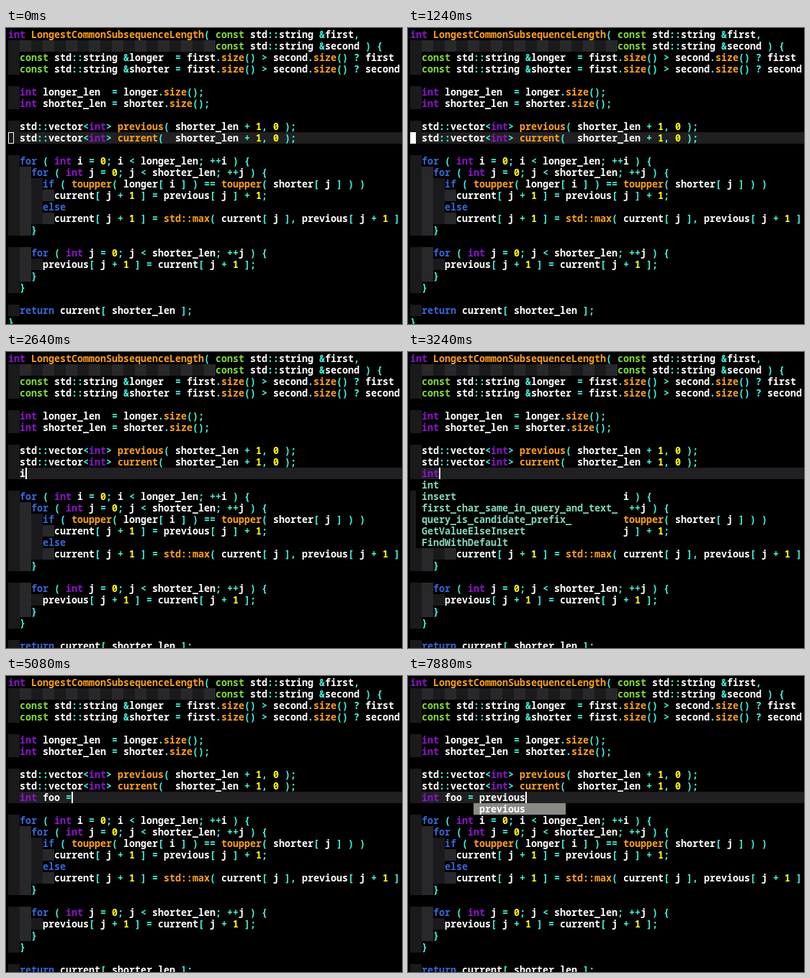
Recreate the animation shown at these times as an HTML page with a canvas. Size 550x412 px, loop 8000 ms.

```html
<!DOCTYPE html>
<html lang="en">
<head>
<meta charset="utf-8">
<title>Code completion</title>
<style>
  html, body { margin: 0; width: 100%; height: 100%; overflow: hidden; background: #000; }
  canvas { display: block; }
</style>
</head>
<body>
<canvas id="stage" width="550" height="412"></canvas>
<script>
const ctx = document.getElementById('stage').getContext('2d');
const LOOP = 8000, COL = 8, ROW = 16, LEFT = 3, TOP = 1, EDIT_ROW = 10;
const WHITE = '#ffffff', GUIDES = ['#1a1a1c', '#28282a'], LINE_BG = '#202022';
const MENU_TEXT = '#84d8b8', MENU_PICK = '#8a8a84';

const code = `int LongestCommonSubsequenceLength( const std::string &first,
                                    const std::string &second ) {
  const std::string &longer  = first.size() > second.size() ? first
  const std::string &shorter = first.size() > second.size() ? second

  int longer_len  = longer.size();
  int shorter_len = shorter.size();

  std::vector<int> previous( shorter_len + 1, 0 );
  std::vector<int> current(  shorter_len + 1, 0 );

  for ( int i = 0; i < longer_len; ++i ) {
    for ( int j = 0; j < shorter_len; ++j ) {
      if ( toupper( longer[ i ] ) == toupper( shorter[ j ] ) )
        current[ j + 1 ] = previous[ j ] + 1;
      else
        current[ j + 1 ] = std::max( current[ j ], previous[ j + 1 ]
    }

    for ( int j = 0; j < shorter_len; ++j ) {
      previous[ j + 1 ] = current[ j + 1 ];
    }
  }

  return current[ shorter_len ];
}`.split('\n');

// A call keeps its namespace, other tokens are words or punctuation.
const tokens = /(?:\w+::)?\w+(?=\()|\w+|[^\w\s]+/g;

// Syntax classes, tried in order.
const syntax = [
  [/^const$/, '#80dc38'],
  [/^int$/, '#9012d0'],
  [/^(for|if|else|return)$/, '#3868d8'],
  [/^\d+$/, '#ffff10'],
  [/^\w+$/, WHITE],
  [/./, '#40fae0']
];

const intMenu = ['int', 'insert', 'first_char_same_in_query_and_text_',
  'query_is_candidate_prefix_', 'GetValueElseInsert', 'FindWithDefault'];
const foMenu = ['for', 'SetResultFeaturesFromQuery', 'ratio_of_word_boundary_chars_in_query_'];
const viMenu = ['void', 'GetValueElseInsert', 'previous'];

// Start time, typed text, menu column, menu entries, entry picked
const steps = [
  [1720, ''],
  [2600, 'i'],
  [2760, 'in'],
  [2880, 'in', 2, intMenu],
  [3080, 'int'],
  [3240, 'int', 2, intMenu],
  [3520, 'int '],
  [3680, 'int f'],
  [3840, 'int fo'],
  [4000, 'int fo', 6, foMenu],
  [4240, 'int foo'],
  [4400, 'int foo', 6, foMenu.slice(2)],
  [4720, 'int foo '],
  [5000, 'int foo ='],
  [5240, 'int foo = '],
  [5760, 'int foo = v'],
  [6080, 'int foo = vi'],
  [6320, 'int foo = vi', 12, viMenu],
  [6520, 'int foo = vio'],
  [6680, 'int foo = vio', 12, viMenu.slice(2)],
  [7160, 'int foo = previous', 12, viMenu.slice(2), true]
];

const x = col => LEFT + col * COL;
const y = row => TOP + row * ROW;

function block(row, col, cols, color) {
  ctx.fillStyle = color;
  ctx.fillRect(x(col), y(row), cols * COL, ROW);
}

function write(text, row, col, color) {
  ctx.fillStyle = color;
  ctx.fillText(text, x(col), y(row) + 13);
}

function drawLine(line, row) {
  const indent = line.search(/\S|$/);
  for (let col = 0; col < indent; col += 2) block(row, col, 2, GUIDES[col / 2 % 2]);
  for (const token of line.matchAll(tokens)) {
    const [word] = token, end = token.index + word.length;
    const isCall = /\w/.test(word) && line[end] === '(';
    const color = isCall ? '#ff9f1c' : syntax.find(([rule]) => rule.test(word))[1];
    write(word, row, token.index, color);
  }
}

function drawMenu(col, items, picked) {
  const width = Math.max(16, ...items.map(item => item.length + 2));
  items.forEach((item, i) => {
    const row = EDIT_ROW + 1 + i;
    block(row, col - 1, width, picked ? MENU_PICK : '#000');
    write(item, row, col, picked ? WHITE : MENU_TEXT);
  });
}

function draw(t) {
  const step = steps.findLast(([start]) => t >= start);
  const lines = [...code];
  if (step) lines.splice(EDIT_ROW, 0, '  ' + step[1]);

  ctx.fillStyle = '#000';
  ctx.fillRect(0, 0, 550, 412);
  ctx.font = '600 13.3333px "Noto Sans Mono", "DejaVu Sans Mono", monospace';
  block(step ? EDIT_ROW : EDIT_ROW - 1, 0, 70, LINE_BG);
  lines.forEach(drawLine);

  if (step) {
    const [, text, col, items, picked] = step;
    if (items) drawMenu(col, items, picked);
    ctx.fillStyle = WHITE;
    ctx.fillRect(x(text.length + 2), y(EDIT_ROW), 2, ROW);
  } else if (t < 520) {
    ctx.strokeStyle = WHITE;
    ctx.lineWidth = 1;
    ctx.strokeRect(x(0) + 0.5, y(EDIT_ROW - 1) + 0.5, COL - 1, ROW - 1);
  } else {
    block(EDIT_ROW - 1, 0, 1, WHITE);
  }
}

const began = performance.now();
function tick() {
  draw((performance.now() - began) % LOOP);
  requestAnimationFrame(tick);
}
tick();
</script>
</body>
</html>
```
